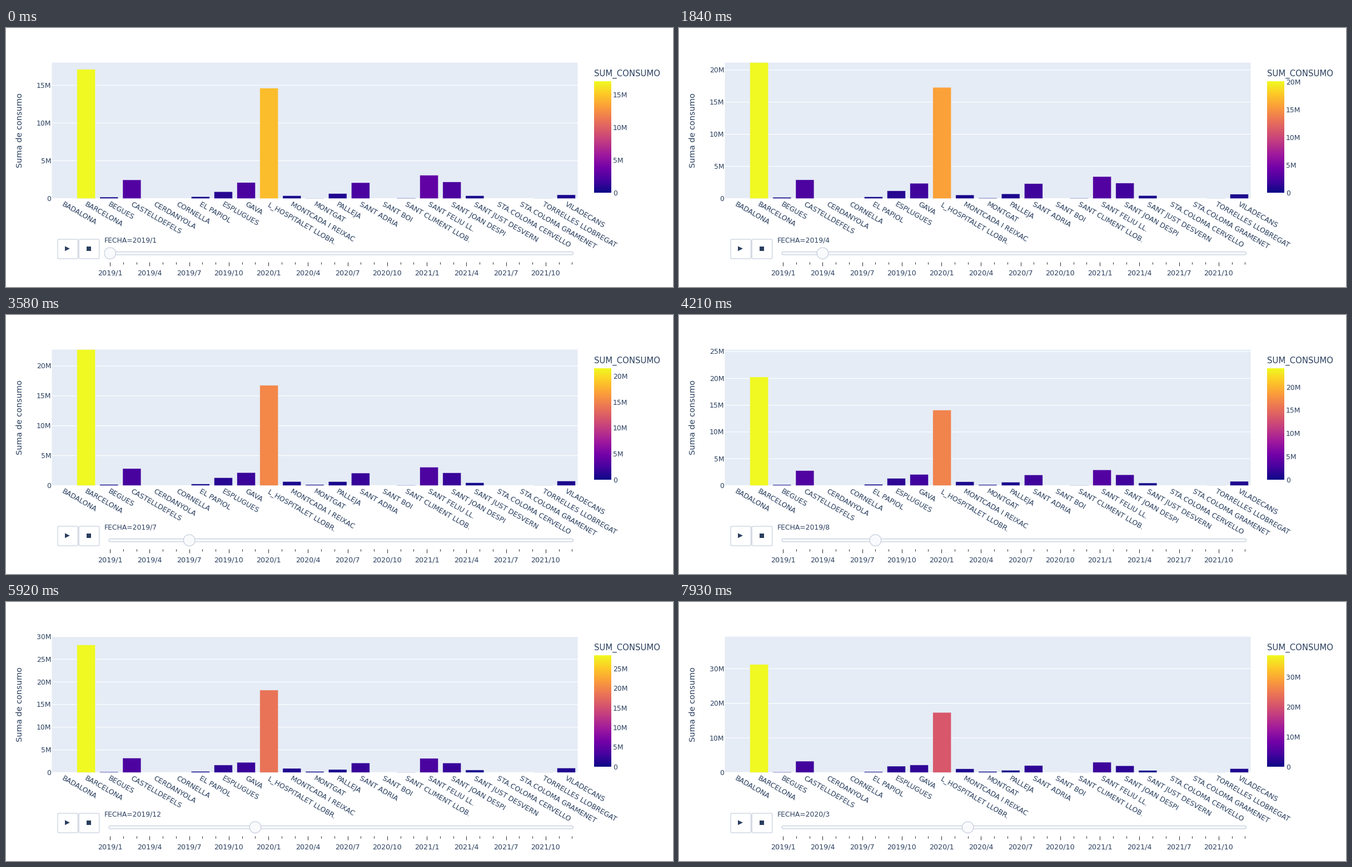
A matplotlib script that plays this animation: 1200 px wide and 467 px high, repeating every 8 s.

```python
import numpy as np
import matplotlib.pyplot as plt
from matplotlib.animation import FuncAnimation
from matplotlib.colors import LinearSegmentedColormap
from matplotlib.patches import Circle, FancyBboxPatch, Polygon, Rectangle

W, H, DPI = 1200, 467, 64
PT = 72 / DPI                      # points per pixel
LOOP, STEP = 8000, 40              # ms
START, PERIOD, TWEEN = 588, 527, 500
LAST = 14

INK, PANEL, BORDER, RAIL = "#2a3f5f", "#e5ecf6", "#bec8d9", "#f8fafc"
LEFT, RIGHT, TOP, BASE = 82.5, 1028.5, 62.4, 307.4
BAR_X0, BAR_X1, BAR_TOP, BAR_BASE = 1058, 1089, 96, 297
SLIDER_X, SLIDER_Y, MONTH_W = 187.2, 406.2, 23.75
TICK_SIZE = 12.4

plasma = LinearSegmentedColormap.from_list("plasma10", [
    "#0d0887", "#46039f", "#7201a8", "#9c179e", "#bd3786",
    "#d8576b", "#ed7953", "#fb9f3a", "#fdca26", "#f0f921"], N=512)

# Each town with its underlying consumption (millions) in the first and last month.
TOWNS = {
    "BADALONA": (0, 0), "BARCELONA": (0, 0), "BEGUES": (.18, .13),
    "CASTELLDEFELS": (2.46, 3.4), "CERDANYOLA": (0, 0), "CORNELLA": (0, 0),
    "EL PAPIOL": (.24, .24), "ESPLUGUES": (.9, 1.9), "GAVA": (2.11, 2.25),
    "L_HOSPITALET LLOBR.": (0, 0), "MONTCADA I REIXAC": (.37, 1.09),
    "MONTGAT": (.03, .3), "PALLEJA": (.65, .65), "SANT ADRIA": (2.09, 2.08),
    "SANT BOI": (0, 0), "SANT CLIMENT LLOB.": (.05, .04),
    "SANT FELIU LL.": (3.08, 3.08), "SANT JOAN DESPI": (2.19, 2.03),
    "SANT JUST DESVERN": (.37, .6), "STA.COLOMA CERVELLO": (0, 0),
    "STA.COLOMA GRAMENET": (0, 0), "TORRELLES LLOBREGAT": (.02, .02),
    "VILADECANS": (.48, 1.15),
}


def consumption():
    """Rows are months, columns are towns."""
    months = np.arange(LAST + 1)
    season = np.interp(months, [0, 3, 6, 8, 10, 13, 14],
                       [1, 1.13, .98, .91, 1, 1.2, .96])
    capital = np.interp(months, [0, 2, 3, 5, 6, 7, 10, 11, 12, 13, 14],
                        [17.1, 20.1, 23.9, 21.6, 24.1, 20, 28.5, 26.5, 32.4, 37.3, 31.2])
    share = np.interp(months, [0, 6, 10, 12, 14], [.855, .71, .645, .65, .556])
    columns = {town: np.linspace(*ends, LAST + 1) * season for town, ends in TOWNS.items()}
    columns["BARCELONA"] = capital
    columns["L_HOSPITALET LLOBR."] = capital * share
    return np.column_stack(list(columns.values()))


DATA = consumption()

plt.rcParams["font.family"] = "DejaVu Sans"
fig = plt.figure(figsize=(W / DPI, H / DPI), dpi=DPI, facecolor="white")
ax = fig.add_axes([0, 0, 1, 1])
ax.axis("off")


def label(x, y, text="", size=TICK_SIZE, ha="left"):
    """Text whose capitals are centred on y."""
    return ax.text(x, y + 0.365 * size, text, size=size * PT, color=INK,
                   ha=ha, va="baseline")


def turned(x, y, text, size, angle, ha):
    ax.text(x, y, text, size=size * PT, color=INK, rotation=angle,
            rotation_mode="anchor", ha=ha, va="baseline")


def box(x0, y0, x1, y1, radius, fill):
    ax.add_patch(FancyBboxPatch(
        (x0, y0), x1 - x0, y1 - y0, fc=fill, ec=BORDER, lw=1.05 * PT,
        boxstyle=f"round,pad=0,rounding_size={radius}", zorder=4))


def month_name(m):
    return f"{2019 + m // 12}/{m % 12 + 1}"


# Plot area, bars and town names
ax.add_patch(Rectangle((LEFT, TOP), RIGHT - LEFT, BASE - TOP, fc=PANEL, lw=0, snap=False))
slot = (RIGHT - LEFT) / len(TOWNS)
bars = []
for i, town in enumerate(TOWNS):
    center = LEFT + (i + 0.5) * slot
    bars.append(ax.add_patch(Rectangle((center - 0.4 * slot, BASE), 0.8 * slot, 0,
                                       ec=PANEL, lw=0.5 * PT, zorder=3, snap=False)))
    turned(center - 3, 320.5, town, 12.6, -30, "left")
turned(29.3, 185, "Suma de consumo", 14.45, 90, "center")

# Colour bar
ax.imshow(np.linspace(1, 0, 256)[:, None], cmap=plasma, aspect="auto",
          extent=(BAR_X0, BAR_X1, BAR_BASE, BAR_TOP), interpolation="bilinear")
label(BAR_X0, 81.5, "SUM_CONSUMO", 14.9)

# Play and stop buttons
box(93, 381, 129.5, 416, 2, "white")
box(131.2, 381, 167.8, 416, 2, "white")
ax.add_patch(Polygon([(106, 393.4), (114.8, 397.8), (106, 402.2)], fc=INK, lw=0, zorder=5))
ax.add_patch(Rectangle((145.3, 394.3), 7.4, 7.2, fc=INK, lw=0, zorder=5))

# Slider
box(185, 403.6, 1020.5, 408.9, 2.6, RAIL)
for m in range(36):
    x = SLIDER_X + m * MONTH_W
    major = m % 3 == 0
    ax.plot([x, x], [422, 429 if major else 426], color="#333333",
            lw=1.05 * PT, solid_capstyle="butt")
    if major:
        label(x, 440.9, month_name(m), 12.7, "center")
grip = ax.add_patch(Circle((SLIDER_X, SLIDER_Y), 10.3, fc=RAIL, ec=BORDER,
                           lw=1.05 * PT, zorder=6))
current = label(177, 381.5)

# Moving axis ticks
grid = [ax.plot([LEFT, RIGHT], [BASE, BASE], color="white", lw=1.2 * PT, zorder=2,
                solid_capstyle="butt", snap=False)[0] for _ in range(9)]
y_labels = [label(81.3, 0, ha="right") for _ in grid]
c_labels = [label(1092, 0) for _ in grid]

ax.set_xlim(0, W)
ax.set_ylim(H, 0)


def place_ticks(labels, top, max_ticks, y_base, length, lines=()):
    step = next(s for s in (2, 5, 10, 20) if s >= top / max_ticks)
    for k, text in enumerate(labels):
        value = k * step
        visible = value <= top + 1e-6
        y = y_base - length * value / top
        text.set_visible(visible)
        text.set_text(f"{value}M" if value else "0")
        text.set_y(y + 0.365 * TICK_SIZE)
        if lines:
            lines[k].set_visible(visible)
            lines[k].set_ydata([y, y])


def draw(frame):
    t = frame * STEP + STEP / 2
    month = int(np.clip((t - START) // PERIOD + 1, 0, LAST))
    previous = max(month - 1, 0)
    progress = min((t - START - previous * PERIOD) / TWEEN, 1)

    # Bars and colours head for the new month; both scales lag one month.
    target = DATA[month]
    values = DATA[previous] + (target - DATA[previous]) * progress
    peak = DATA[previous].max()
    y_top = peak / 0.95
    for bar, value, goal in zip(bars, values, target):
        bar.set_height(-min(value / y_top, 1) * (BASE - TOP))
        bar.set_facecolor(plasma(goal / target.max()))
        bar.set_visible(value > 0)
    place_ticks(y_labels, y_top, 7.2, BASE, BASE - TOP, grid)
    place_ticks(c_labels, peak, 6, BAR_BASE, BAR_BASE - BAR_TOP)
    grip.center = (SLIDER_X + month * MONTH_W, SLIDER_Y)
    current.set_text(f"FECHA={month_name(month)}")
    return bars


animation = FuncAnimation(fig, draw, frames=LOOP // STEP, interval=STEP,
                          repeat=True, repeat_delay=0, blit=False)
plt.show()
```
